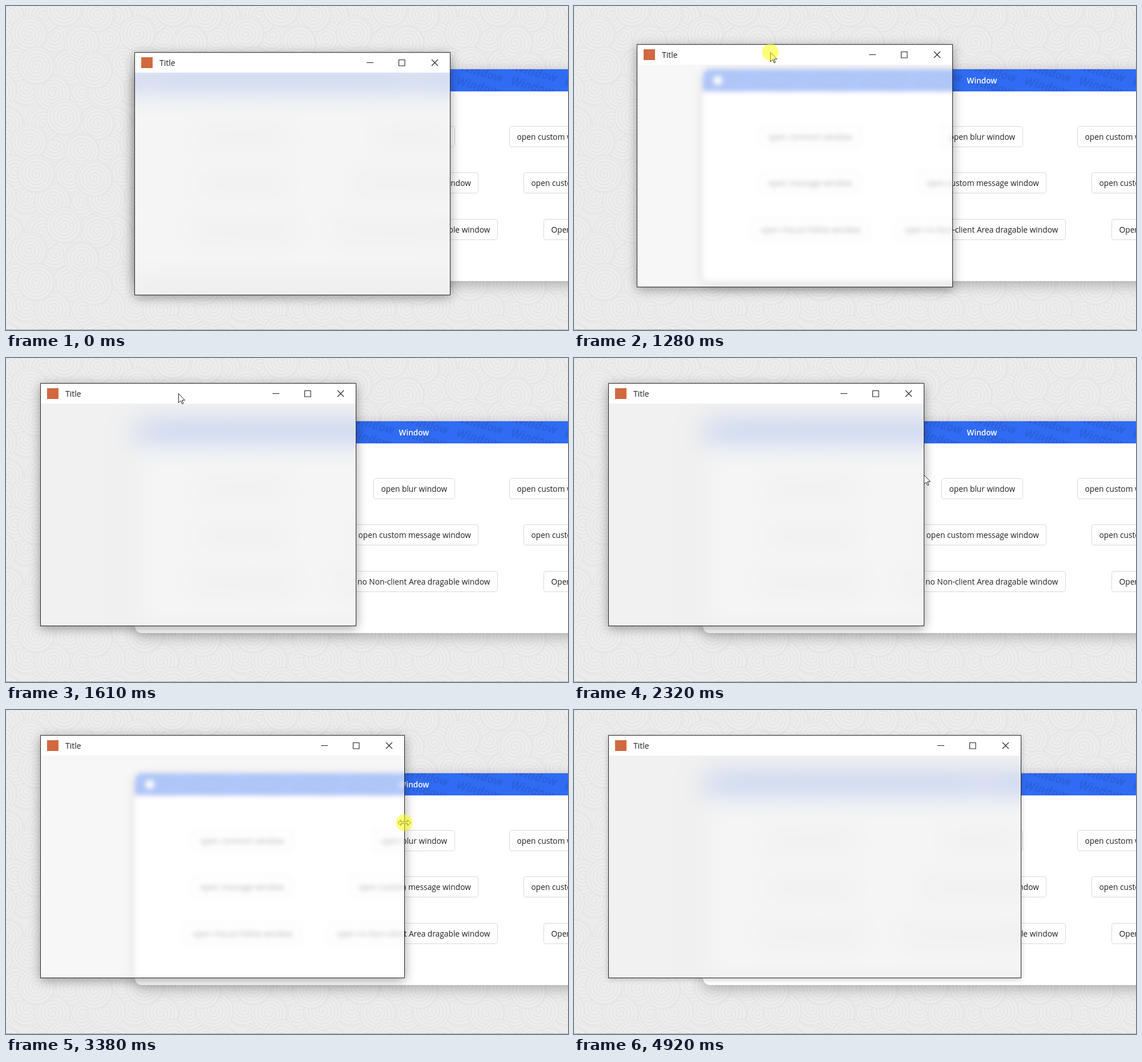
Write an HTML page with a canvas that moves like this. It is 985 by 569 pixels and loops after 4990 ms.

```html
<!DOCTYPE html>
<html lang="en">
<head>
<meta charset="utf-8">
<title>Blur window</title>
<style>
  html, body { margin: 0; width: 100%; height: 100%; overflow: hidden; }
  body { font: 13.75px "Open Sans", "Noto Sans", sans-serif; color: #202020; }
  #stage { position: relative; width: 985px; height: 569px; overflow: hidden; background: #ececec; }
  #stage > *, #win > *, .main, .main > * { position: absolute; }
  #paper { left: 0; top: 0; }
  #edge { left: 0; top: 568px; width: 985px; height: 1px; background: #a9a9a9; }

  .main { left: 226px; top: 111px; width: 980px; height: 372px; border-radius: 12px;
    background: #fff; box-shadow: 0 6px 24px rgba(0, 0, 0, .28); }
  .bar { left: 0; top: 0; width: 980px; height: 39px; overflow: hidden;
    border-radius: 12px 12px 0 0; background: #306bf3; }
  .bar svg { position: absolute; left: 0; top: 0; }
  .bar b { position: absolute; left: 0; width: 978px; text-align: center; line-height: 40px;
    font-size: 13.6px; font-weight: 600; color: #fff; }
  .btn { height: 35px; padding: 0 12.5px; line-height: 36px; white-space: nowrap;
    border: 1px solid #d9d9d9; border-radius: 5px; }

  #win { box-sizing: border-box; height: 427px; border: 1px solid #262626;
    box-shadow: 0 4px 18px rgba(0, 0, 0, .36); }
  #win.idle { box-shadow: 0 2px 9px rgba(0, 0, 0, .22); }
  #head { left: 0; right: 0; top: 0; height: 35px; background: #fff; }
  #logo { left: 11px; top: 8px; width: 20px; height: 19px; background: #d0693f; }
  #name { left: 43px; top: 0; line-height: 36px; font-size: 14px; }
  #ctl { right: 0; top: 0; }

  #glass { inset: 0; overflow: hidden; }
  #glass > * { position: absolute; }
  #lens { width: 985px; height: 569px; background: #ececec; overflow: hidden; filter: blur(20px); }
  #tint { inset: 0; background: rgba(242, 242, 242, .78); }
  .light #lens { filter: blur(4px); }
  .light #tint { background: rgba(255, 255, 255, .62); }
  /* The blur samples only what lies under the window, so its edge is extended. */
  #lens.wide::after { content: ""; position: absolute; left: 126px; top: 111px; width: 114px; height: 372px;
    background: linear-gradient(#306bf3 39px, #fff 0); }

  #cursor { left: 0; top: 0; overflow: visible; }
</style>
</head>
<body>
<div id="stage">
  <canvas id="paper" width="985" height="569"></canvas>
  <div id="edge"></div>
  <div class="main">
    <div class="bar">
      <svg width="980" height="39" font-size="20.5" font-weight="700" font-style="italic" fill="#000" fill-opacity=".09">
        <circle cx="26" cy="20" r="8" fill="#fff" fill-opacity="1"/>
      </svg>
      <b>Window</b>
    </div>
  </div>
  <div id="win">
    <div id="glass"><div id="lens"></div><div id="tint"></div></div>
    <div id="head"></div>
    <div id="logo"></div>
    <div id="name">Title</div>
    <svg id="ctl" width="160" height="35" fill="none" stroke="#222" stroke-width="1.1">
      <path d="M14 17.5h12M70.5 12.5h10.5v10.5h-10.5zM128 12l11 11m0-11l-11 11"/>
    </svg>
  </div>
  <svg id="cursor" width="1" height="1" fill="#fff" stroke="#222" stroke-linejoin="round">
    <path id="arrow" d="M.5 .5V16.5L4.2 13 6.8 18.7 9 17.8 6.5 12.2H11.5Z"/>
    <path id="sizer" d="M-11 0L-6 -5V-1.5H6V-5L11 0 6 5V1.5H-6V5Z"/>
    <circle id="press" r="14.5" fill="#ff0" fill-opacity=".52" stroke="none"/>
  </svg>
</div>
<script>
const $ = id => document.getElementById(id);
const LOOP = 4990, STEP = 68;
const main = document.querySelector('.main');

// Spiral wallpaper: overlapping discs on a jittered, repeating lattice.
function drawPaper() {
  const T = 190, N = 4, tile = document.createElement('canvas');
  tile.width = tile.height = T;
  const g = tile.getContext('2d');
  g.fillStyle = '#ededed';
  g.strokeStyle = '#e5e5e5';
  g.lineWidth = 1.8;
  let seed = 7;
  const rand = () => (seed = seed * 16807 % 2147483647) / 2147483647;
  const spiral = (x, y, R, turn) => {
    g.beginPath();
    g.arc(x, y, R, 0, 7);
    g.fill();
    g.stroke();
    g.beginPath();
    for (let r = 1.5; r < R; r += .25) {
      const a = turn + r / 6.2 * Math.PI * 2;
      g.lineTo(x + r * Math.cos(a), y + r * Math.sin(a));
    }
    g.stroke();
  };
  for (let i = 0; i < N * N; i++) {
    const k = i * 7 % (N * N), row = Math.floor(k / N);
    const x = (k % N + row % 2 / 2 + rand() * .4) * T / N, y = (row + rand() * .4) * T / N;
    const R = 30 + rand() * 4, turn = rand() * 6;
    for (const dx of [-T, 0, T])
      for (const dy of [-T, 0, T]) spiral(x + dx, y + dy, R, turn);
  }
  const c = $('paper').getContext('2d');
  c.fillStyle = c.createPattern(tile, 'repeat');
  c.fillRect(0, 0, 985, 569);
}

function addMarks() {
  let out = '';
  for (let i = -1; i < 11; i++)
    for (let row = 0; row < 3; row++) {
      const x = 100 + 95 * i - 6.4 * row, y = 23.8 * row - 21;
      out += `<text transform="translate(${x} ${y}) rotate(15)">Window</text>`;
    }
  main.querySelector('svg').insertAdjacentHTML('beforeend', out);
}

function addButtons() {
  const rows = [
    { 101: 'open common window', 418: 'open blur window', 656: 'open custom window' },
    { 101: 'open message window', 378: 'open custom message window', 681: 'open custom modal window' },
    { 87: 'open mouse follow window', 340: 'open no Non-client Area dragable window', 716: 'Open layered window' }
  ];
  rows.forEach((row, i) => {
    for (const [x, text] of Object.entries(row)) {
      const b = document.createElement('div');
      b.className = 'btn';
      b.textContent = text;
      b.style.left = x + 'px';
      b.style.top = Math.floor(100 + 81.5 * i) + 'px';
      main.append(b);
    }
  });
}

// Key poses: [time, x, y] for the pointer, [time, x, y, width] for the window.
const mouseKeys = [
  [330, 723, 448], [820, 460, 102],
  [1080, 460, 102], [1280, 344, 81], [1480, 302, 62],
  [1640, 302, 62], [1970, 387, 168], [2180, 540, 224], [2320, 613, 205],
  [3110, 613, 205], [3520, 783, 191],
  [3650, 783, 191], [4130, 830, 525]
];
const winKeys = [
  [0, 225, 81, 554], [1080, 225, 81, 554], [1280, 110, 67, 554], [1480, 60, 44, 554],
  [3110, 60, 44, 554], [3520, 60, 44, 724]
];

// Moves between key poses in equal steps, like a screen recording.
function pose(keys, t) {
  const i = keys.findLastIndex(k => k[0] <= t);
  const a = keys[i], b = keys[i + 1] || a, span = b[0] - a[0] || 1;
  const n = Math.max(1, Math.round(span / STEP));
  const u = Math.floor((t - a[0]) / span * n + 1e-6) / n;
  return a.slice(1).map((v, j) => Math.round(v + (b[j + 1] - v) * (b === a ? 0 : u)));
}

const within = (t, a, b) => t >= a && t < b;
const show = (id, on) => $(id).style.display = on ? '' : 'none';

function render(t) {
  const win = $('win'), lens = $('lens'), [x, y, w] = pose(winKeys, t);
  win.style.left = x + 'px';
  win.style.top = y + 'px';
  win.style.width = w + 'px';
  lens.style.left = -x - 1 + 'px';
  lens.style.top = -y - 1 + 'px';
  lens.classList.toggle('wide', x >= 225);
  const resizing = within(t, 3110, 3650);
  win.classList.toggle('light', within(t, 1080, 1550) || resizing);
  win.classList.toggle('idle', t >= 4920);

  const seen = within(t, 330, 4130), sizing = within(t, 2780, 3780);
  show('cursor', seen);
  if (!seen) return;
  const [mx, my] = pose(mouseKeys, t);
  $('cursor').style.transform = `translate(${mx}px, ${my}px)`;
  show('arrow', !sizing);
  show('sizer', sizing);
  show('press', within(t, 950, 1480) || resizing);
}

drawPaper();
addMarks();
addButtons();
$('lens').append(main.cloneNode(true));
const start = performance.now();
function tick() {
  render((performance.now() - start) % LOOP);
  requestAnimationFrame(tick);
}
tick();
</script>
</body>
</html>
```
